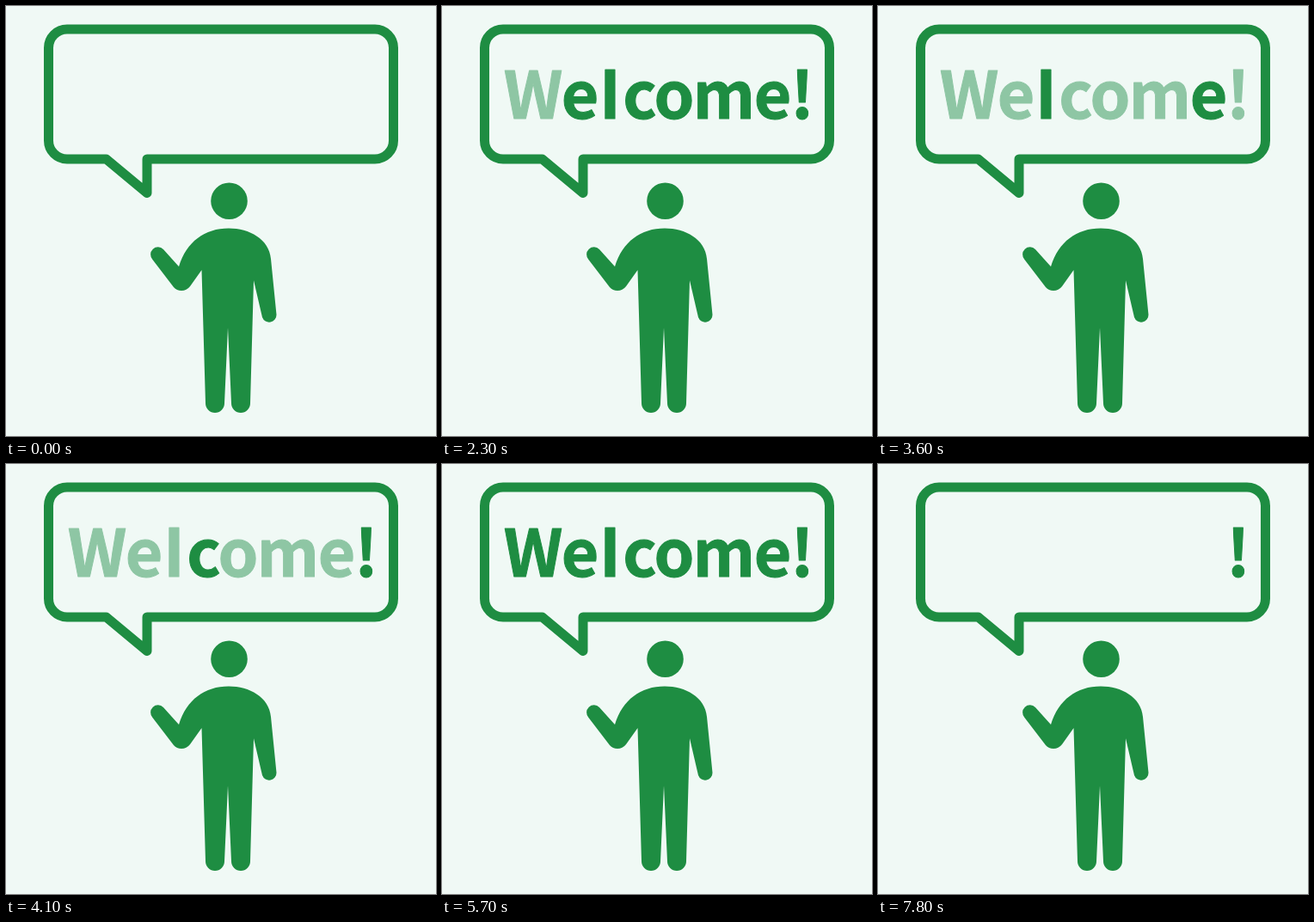
These frames come from a looping animation (500 by 500 pixels, 7.9 s). An HTML page:

```html
<!DOCTYPE html>
<html lang="en">
<head>
<meta charset="utf-8">
<title>Welcome</title>
<style>
  html, body { margin: 0; width: 100%; height: 100%; overflow: hidden; background: #f0f9f5; }
  svg { display: block; width: 100%; height: 100%; }
  text {
    font: 700 75px "Noto Sans CJK JP", "Noto Sans CJK SC", "Noto Sans CJK", "Noto Sans", sans-serif;
    text-anchor: middle;
    stroke-width: 1;
    stroke-linejoin: round;
  }
  /* a plain stem, without the tail */
  .stem { font-family: "Open Sans", "Noto Sans", sans-serif; }
</style>
</head>
<body>
<svg viewBox="0 0 500 500">
  <path fill="none" stroke="#1e8d42" stroke-width="11" stroke-linejoin="round"
    d="M164 178H429a21.5 21.5 0 0 0 21.5-21.5V48.5A21.5 21.5 0 0 0 429 27H71A21.5 21.5 0 0 0 49.5 48.5V156.5A21.5 21.5 0 0 0 71 178H116.5L164 217.5Z"/>
  <g fill="#1e8d42">
    <circle cx="259.5" cy="226.7" r="21.3"/>
    <path d="M201 303C210 274 231 258.5 259 258.5C283 258.5 306 271 308 294
      L314.5 359A8.5 8.5 0 0 1 298 362L288 319L284 462A11 11 0 0 1 262 462
      L258 374L254 462A11 11 0 0 1 232 462L227.5 307L214 326Q210 331 204 331Q198.500 331 195 327
      L170.500 295A8.600 8.600 0 0 1 183 283Z"/>
  </g>
  <g id="word"></g>
</svg>
<script>
const LOOP = 7900, STEP = 100;
const DARK = "#1e8d42", LIGHT = "#8ec6a4";
const WORD = "Welcome!";
const CENTERS = [106, 160.5, 195.5, 230, 270, 328, 384.5, 419];
const SHOW = 1, CHASE = 23, HIDE = 72; // starting steps of each phase
const CHASE_LENGTH = 27;

const letters = [...WORD].map((char, i) => {
  const text = document.createElementNS("http://www.w3.org/2000/svg", "text");
  text.textContent = char;
  text.setAttribute("x", CENTERS[i]);
  text.setAttribute("y", 131);
  if (char === "l") text.setAttribute("class", "stem");
  document.getElementById("word").append(text);
  return text;
});

function render(time) {
  const step = Math.floor((time % LOOP) / STEP);
  letters.forEach((letter, i) => {
    const local = step - i; // each letter lags its neighbour by one step
    const visible = local >= SHOW && local < HIDE;
    const n = local - CHASE;
    const pale = n >= 0 && n < CHASE_LENGTH && n % 4 !== 3;
    const color = pale ? LIGHT : DARK;
    letter.setAttribute("visibility", visible ? "visible" : "hidden");
    letter.setAttribute("fill", color);
    letter.setAttribute("stroke", color);
  });
}

const start = performance.now();
function tick() {
  render(performance.now() - start);
  requestAnimationFrame(tick);
}
tick();
</script>
</body>
</html>
```
